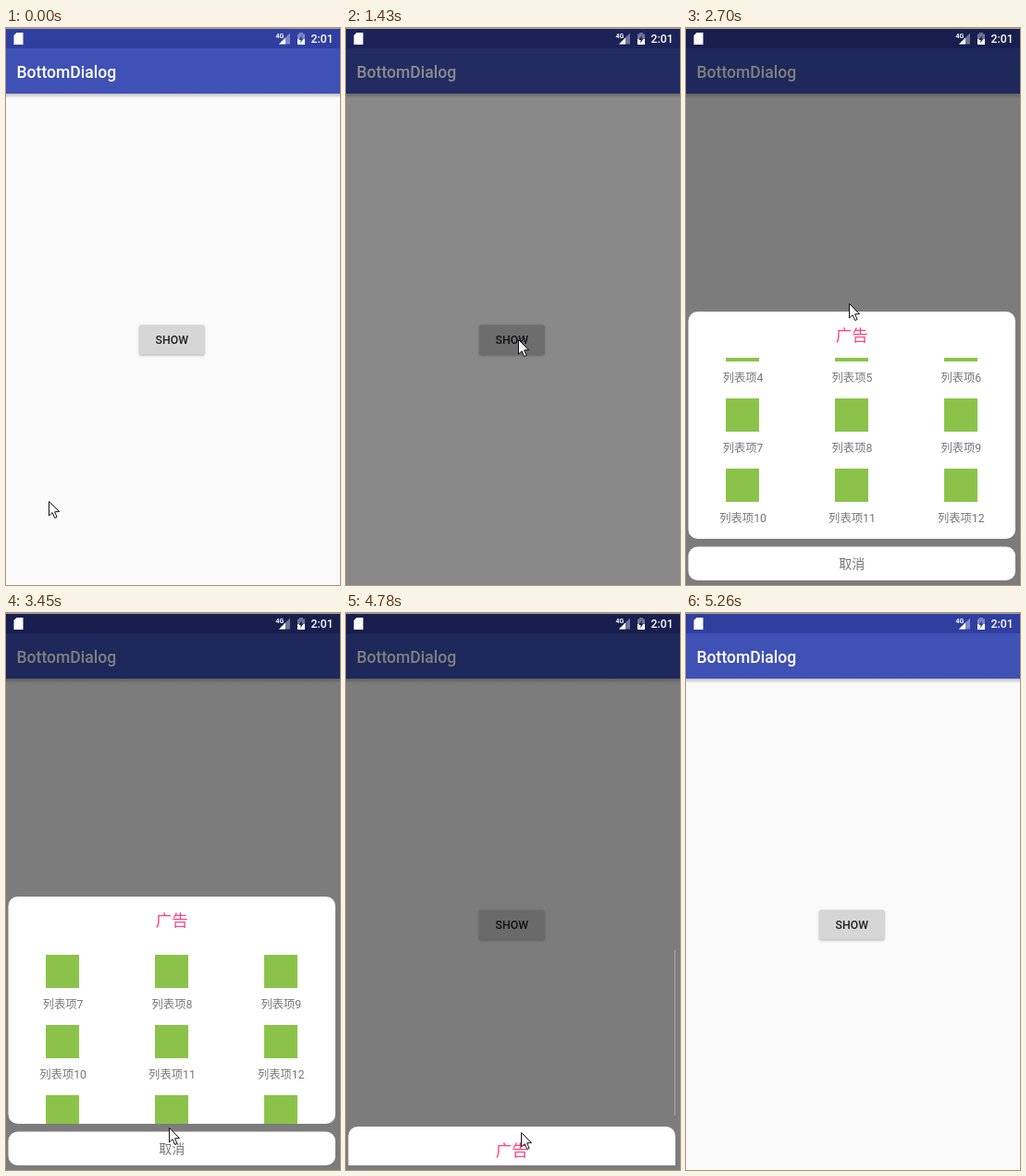
Write an HTML page with a canvas that moves like this. It is 361x603 px and loops after 5.54 s.

```html
<!DOCTYPE html>
<html lang="zh-CN">
<head>
<meta charset="utf-8">
<title>BottomDialog</title>
<style>
  html, body { margin: 0; width: 361px; height: 603px; overflow: hidden; background: #fafafa; }
  canvas { display: block; width: 361px; height: 603px; }
</style>
</head>
<body>
<canvas id="stage"></canvas>
<script>
const W = 361, H = 603, LOOP = 5540;
const FONT = 'Roboto, "Noto Sans CJK SC", "Noto Sans CJK", sans-serif';
const canvas = document.getElementById('stage');
const ctx = canvas.getContext('2d');
const dpr = window.devicePixelRatio || 1;
canvas.width = W * dpr;
canvas.height = H * dpr;

// The screen refreshes in steps, a little faster in the second half.
const SLOW = 141.4, FAST = 120, SWITCH = 20, SWITCH_TIME = 2850;
const stepAt = ms => ms < SWITCH_TIME
  ? Math.floor(ms / SLOW)
  : SWITCH + Math.floor((ms - SWITCH_TIME) / FAST);
const timeOf = step => step < SWITCH
  ? step * SLOW
  : SWITCH_TIME + (step - SWITCH) * FAST;

// Pointer way points: step, x, y
const PATH = [
  [0, 46, 512], [1, 182, 513], [3, 186, 347], [6, 187, 338], [13, 186, 337],
  [16, 171, 468], [19, 176, 298], [20, 176, 298], [25, 176, 557],
  [28, 174, 575], [31, 170, 580], [36, 189, 562], [38, 204, 574], [40, 222, 596]
];

const PRESS = 1270, OPEN = 1414, SCROLL = 2260, CLOSE = 4469, FADE = 4848;
const PANEL = { x: 2.5, w: 353.5, top: 307, list: 357, split: 553, cancel: 561.5, bottom: 598 };

const progress = (t, from, dur) => Math.max(0, Math.min(1, (t - from) / dur));
const easeInOut = p => 0.5 - Math.cos(Math.PI * p) / 2;

function rect(x, y, w, h, color) {
  ctx.fillStyle = color;
  ctx.fillRect(x, y, w, h);
}

function roundRect(x, y, w, h, r, color) {
  ctx.beginPath();
  ctx.roundRect(x, y, w, h, r);
  ctx.fillStyle = color;
  ctx.fill();
}

function poly(points, color) {
  ctx.beginPath();
  points.forEach(([x, y]) => ctx.lineTo(x, y));
  ctx.closePath();
  ctx.fillStyle = color;
  ctx.fill();
}

function text(str, x, y, size, color, weight = 400, align = 'center') {
  ctx.font = `${weight} ${size}px ${FONT}`;
  ctx.textAlign = align;
  ctx.fillStyle = color;
  ctx.fillText(str, x, y);
}

function drawButton(t) {
  const box = [144, 321.5, 70.5, 32, 2];
  ctx.save();
  ctx.shadowColor = 'rgba(0,0,0,.3)';
  ctx.shadowBlur = 2.5 * dpr;
  ctx.shadowOffsetY = dpr;
  roundRect(...box, '#d6d6d6');
  ctx.restore();
  if (t > PRESS && t < SCROLL) {
    ctx.save();
    ctx.clip();
    ctx.beginPath();
    ctx.arc(186, 338, 11 + (t - PRESS) * 0.35, 0, Math.PI * 2);
    ctx.fillStyle = 'rgba(0,10,5,.07)';
    ctx.fill();
    ctx.restore();
  }
  text('SHOW', 179.3, 342, 12.3, '#212121', 500);
}

function drawApp(t) {
  rect(0, 0, W, H, '#fafafa');
  const shade = ctx.createLinearGradient(0, 71, 0, 76);
  shade.addColorStop(0, 'rgba(0,0,0,.24)');
  shade.addColorStop(1, 'rgba(0,0,0,0)');
  rect(0, 71, W, 5, shade);
  rect(0, 22, W, 49, '#3f51b5');
  rect(0, 0, W, 22, '#303f9f');
  text('BottomDialog', 11.5, 54, 17.56, '#fff', 500, 'left');
  drawButton(t);
}

function drawStatus(barColor) {
  const faint = 'rgba(255,255,255,.38)';
  poly([[11.5, 5], [18.5, 5], [18.5, 18], [8.5, 18], [8.5, 8]], '#fff');

  text('4G', 291.5, 11, 7, '#fff', 700, 'left');
  poly([[307, 5.5], [307, 17.5], [295, 17.5]], faint);
  poly([[302, 10.5], [302, 17.5], [295, 17.5]], '#fff');

  rect(317, 5, 4, 1.5, faint);
  rect(315, 6.5, 8, 5.5, faint);
  rect(315, 12, 8, 6, '#fff');
  poly([[319.8, 8], [316.5, 13], [318.6, 13], [318.2, 16.5], [321.5, 11.6], [319.6, 11.6]], barColor);

  text('2:01', 353.7, 16, 12.3, '#fff', 500, 'right');
}

function drawList(scroll) {
  for (let i = 0; i < 15; i++) {
    const x = PANEL.x + PANEL.w * (i % 3 + 0.5) / 3;
    const y = 372 + Math.floor(i / 3) * 76 - scroll;
    rect(Math.round(x - 18), y, 36, 36, '#8bc34a');
    text('列表项' + (i + 1), x + 0.2, y + 57.6, 12.3, '#757575');
  }
}

function drawDialog(t) {
  const { x, w, top, list, split, cancel, bottom } = PANEL;
  const shown = easeInOut(progress(t, OPEN, 280)) - easeInOut(progress(t, CLOSE, 400));
  if (shown <= 0) return;
  if (t > CLOSE + FAST) rect(355, 365, 1, 179, '#a8a8a8');

  ctx.save();
  ctx.beginPath();
  ctx.rect(0, 0, W, bottom);
  ctx.clip();
  ctx.translate(0, Math.round((1 - shown) * (bottom - top)));
  roundRect(x, top, w, split - top, 10, '#fff');
  roundRect(x, cancel, w, bottom - cancel, 10, '#fff');
  text('广告', 179.3, 338.6, 17.56, '#ff4081');
  text('取消', 179.3, 585.3, 14.05, '#757575');

  ctx.beginPath();
  ctx.rect(x, list, w, split - list);
  ctx.clip();
  drawList(Math.round(154 * easeInOut(progress(t, SCROLL + 5, 600))));
  ctx.restore();
}

function drawPointer(step) {
  const next = PATH.findIndex(p => p[0] > step);
  if (next < 0) return;
  const [s0, x0, y0] = PATH[next - 1];
  const [s1, x1, y1] = PATH[next];
  const p = easeInOut((step - s0) / (s1 - s0));
  ctx.save();
  ctx.translate(Math.round(x0 + (x1 - x0) * p) + 0.5, Math.round(y0 + (y1 - y0) * p) + 0.5);
  poly([[0, 0], [0, 15.5], [3.6, 12.2], [6.2, 18], [8.6, 17], [6.1, 11.3], [11, 11]], '#fff');
  ctx.strokeStyle = '#10101c';
  ctx.lineJoin = 'round';
  ctx.stroke();
  ctx.restore();
}

function draw(now) {
  const step = stepAt(now % LOOP);
  const t = timeOf(step);
  const dim = 0.5 * (progress(t, 1280, 147) - progress(t, FADE, 200));
  const lit = 1 - dim;
  ctx.setTransform(dpr, 0, 0, dpr, 0, 0);
  drawApp(t);
  rect(0, 0, W, H, `rgba(0,0,0,${dim})`);
  drawStatus(`rgb(${48 * lit},${63 * lit},${159 * lit})`);
  rect(0, 0, W, 1, '#a6a6a0');
  drawDialog(t);
  drawPointer(step);
}

function loop() {
  draw(performance.now());
  requestAnimationFrame(loop);
}
loop();
</script>
</body>
</html>
```
